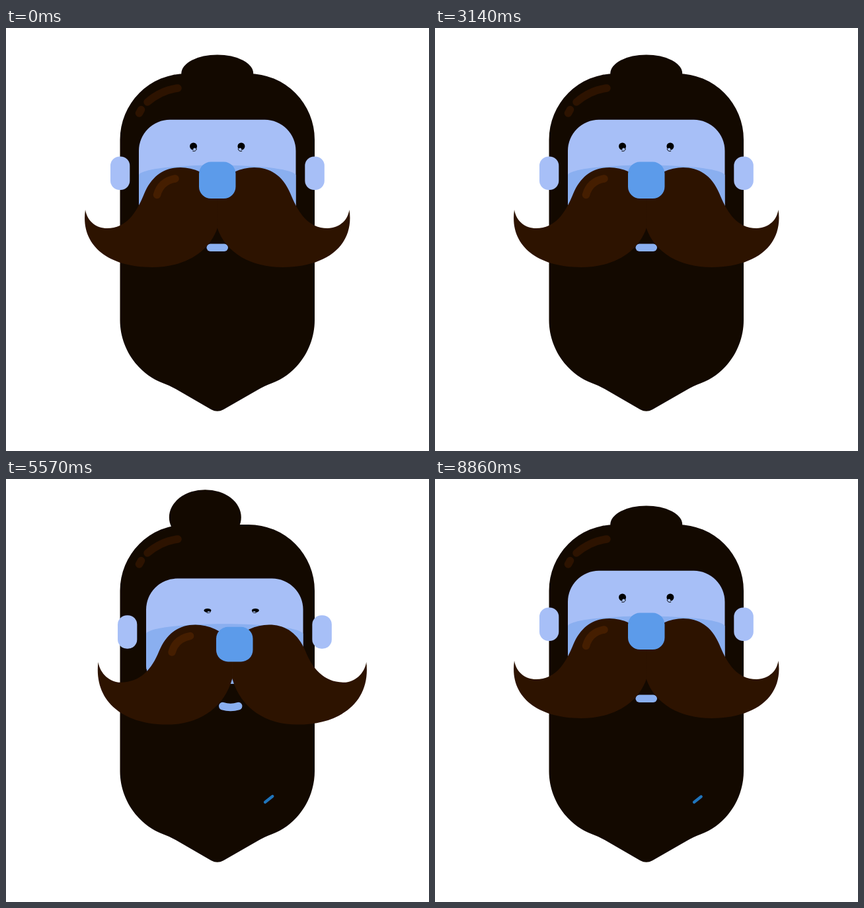
An HTML page for the animation above (8.93 s loop, 640 px wide and 640 px high).

```html
<!DOCTYPE html>
<html lang="en">
<head>
<meta charset="utf-8">
<title>Bearded man</title>
<style>
  html, body { margin: 0; width: 100%; height: 100%; overflow: hidden; background: #fff; }
  svg { display: block; width: 100%; height: 100%; }
  .hair { fill: #130900; }
  .skin { fill: #a7bff7; }
  .shade { fill: #8aaff0; }
  .line { fill: none; stroke-linecap: round; stroke-linejoin: round; }
</style>
</head>
<body>
<svg viewBox="0 0 640 640">
  <ellipse id="bun" class="hair"/>
  <g id="head">
    <path class="hair" d="M172.5 169A100 100 0 0 1 272.5 69H367A100 100 0 0 1 467 169V442C467 484 441 523 402 537.5Q392 541 380 548L329 577.3Q319.75 582.3 310.5 577.3L260 548Q248 541 238 537.5C199 523 172.5 484 172.5 442Z"/>
    <path class="line" stroke="#2d1300" stroke-width="11.5" d="M201.5 129L204.5 123.5M214 112Q235 94 260 91"/>
  </g>
  <g id="ears" class="skin">
    <rect x="158" y="-25.3" width="29.3" height="50.6" rx="14"/>
    <rect x="452.3" y="-25.3" width="29.5" height="50.6" rx="14"/>
  </g>
  <g id="face">
    <path class="skin" d="M201 186A47 47 0 0 1 248 138.8H391.5A47 47 0 0 1 438.5 186V270A28 28 0 0 1 410.5 298H229A28 28 0 0 1 201 270Z"/>
    <path class="shade" d="M201 222C215 202.7 424 202.7 438.5 222V270A28 28 0 0 1 410.5 298H229A28 28 0 0 1 201 270Z"/>
  </g>
  <g id="eyes">
    <g id="eye">
      <circle cx="-36.2" r="5.5"/>
      <circle class="skin" cx="-34.4" cy="4.6" r="2.1"/>
      <path class="line" stroke="#000" d="M-37 7.2Q-32.5 8.4 -31.4 4"/>
    </g>
    <use href="#eye" transform="scale(-1 1)"/>
  </g>
  <path id="mouth" class="line" stroke="#8aaff0" stroke-width="11.5"/>
  <g id="moustache">
    <path id="half" fill="#2d1300"/>
    <use href="#half" transform="translate(639.5 0) scale(-1 1)"/>
    <path class="line" stroke="#451e00" stroke-width="11.5" d="M228.5 252.5Q234 232 256 228"/>
  </g>
  <rect id="nose" fill="#5c9bea" rx="18"/>
  <path id="ribbon" class="line" stroke="#1f75bc" stroke-width="4.3" pathLength="100" d="M392 489L404 479.5C411 474 415.5 467 415.5 460.5C415.5 453 411 449.5 404 449.5C397 449.5 392.5 453 392.5 460.5C392.5 467 397 474 404 479.5L416 489"/>
</svg>
<script>
const LOOP = 8930, STEP = LOOP / 125, CX = 319.75;

// Breath and gaze are amounts; the others are sideways shifts in pixels.
const rest = { breath: 0, down: 0, face: 0, nose: 0, moustache: 0, mouth: 0 };
const inhale = { ...rest, breath: 1 };
const lookAside = { breath: 0, down: -.04, face: 8, nose: 22, moustache: 23, mouth: 8 };
const lookDown = { breath: 0, down: 1, face: 12.3, nose: 27.7, moustache: 18, mouth: 25 };

const moves = [
  { from: 600, to: 1200, pose: inhale },
  { from: 1200, to: 2640, pose: rest },
  { from: 3570, to: 4400, pose: lookAside },
  { from: 4900, to: 5950, pose: lookDown },
  { from: 6050, to: 7140, pose: rest }
];

const progress = (t, from, to) => Math.min(1, Math.max(0, (t - from) / (to - from)));
function ease(t, from, to) {
  const u = progress(t, from, to);
  return u * u * (3 - 2 * u);
}

function poseAt(t) {
  const now = { ...rest };
  for (const { from, to, pose } of moves) {
    const u = ease(t, from, to);
    for (const key in now) now[key] += (pose[key] - now[key]) * u;
  }
  now.moustache += 8 * Math.sin(Math.PI * progress(t, 4700, 5700));
  return now;
}

const parts = {};
document.querySelectorAll('[id]').forEach(el => parts[el.id] = el);

function set(id, attributes) {
  for (const name in attributes) parts[id].setAttribute(name, attributes[name]);
}
const move = (id, x, y, scale = '1 1') =>
  set(id, { transform: `translate(${x} ${y}) scale(${scale})` });

// The tips and the notch lift as the curl grows.
function halfMoustache(curl) {
  const notch = 302 - 15 * curl, tipX = 120 - 4.5 * curl, tipY = 275 - 11 * curl;
  const dipX = 153 - 3 * curl, dipY = 303 - 7 * curl;
  return `M${CX + .3} ${notch}C307 ${341 - 4 * curl} 268 362 221 362
    C156 362 ${112 - 3 * curl} ${330 - 3 * curl} ${tipX} ${tipY}
    C${tipX + 3} ${tipY + 18} ${dipX - 16} ${dipY} ${dipX} ${dipY}
    C${dipX + 30} ${dipY} 198 278 209 251
    C221 222 241 211 264 211C284 211 305 220 ${CX + .3} 238Z`;
}

function draw(t) {
  const { breath, down, face, nose, moustache, mouth } = poseAt(t);
  const smile = ease(t, 5400, 6000) - ease(t, 8400, 8830);
  const drawn = ease(t, 5440, 6030) - ease(t, 8400, 8986);
  const curl = Math.max(0, breath + down);
  const faceY = 17 * down - 7.3 * breath;

  set('bun', {
    cx: CX - 1.67 * face, cy: 69 - 6.7 * breath - 16 * down,
    rx: 54.5 - 2 * breath, ry: 28.6 + 7.3 * breath + 19 * down
  });
  set('head', {
    transform: `translate(${CX} 302) scale(${1 - .032 * breath} ${1 + .0285 * breath}) translate(${-CX} -302)`
  });
  move('ears', face, 219.7 + faceY, `1 ${1 - .11 * breath}`);
  move('face', face, faceY);
  move('eyes', CX + 1.94 * face, 179 + 28.6 * down - 5.3 * breath, `1 ${1 - .67 * curl}`);

  const halfWidth = 10.5 + 7.5 * smile, mouthY = 332.3 - 2.3 * smile;
  set('mouth', { d: `M${CX - halfWidth} ${mouthY}q${halfWidth} ${17.6 * smile} ${2 * halfWidth} 0` });
  move('mouth', mouth, faceY);

  set('half', { d: halfMoustache(curl) });
  move('moustache', moustache, 13.8 * down - 9.8 * breath);

  const width = 55.5 - 4.5 * breath, height = 55.5 - 4 * Math.max(0, down);
  set('nose', {
    x: CX + nose - width / 2, y: 230.3 + 28.6 * down - 5 * breath - height / 2,
    width, height
  });
  set('ribbon', {
    'stroke-dasharray': `${100 * drawn} 200`,
    visibility: drawn > .01 ? 'visible' : 'hidden'
  });
}

const start = performance.now();
function tick() {
  const elapsed = (performance.now() - start) % LOOP;
  draw(Math.floor((elapsed + 4) / STEP) * STEP % LOOP);
  requestAnimationFrame(tick);
}
tick();
</script>
</body>
</html>
```
